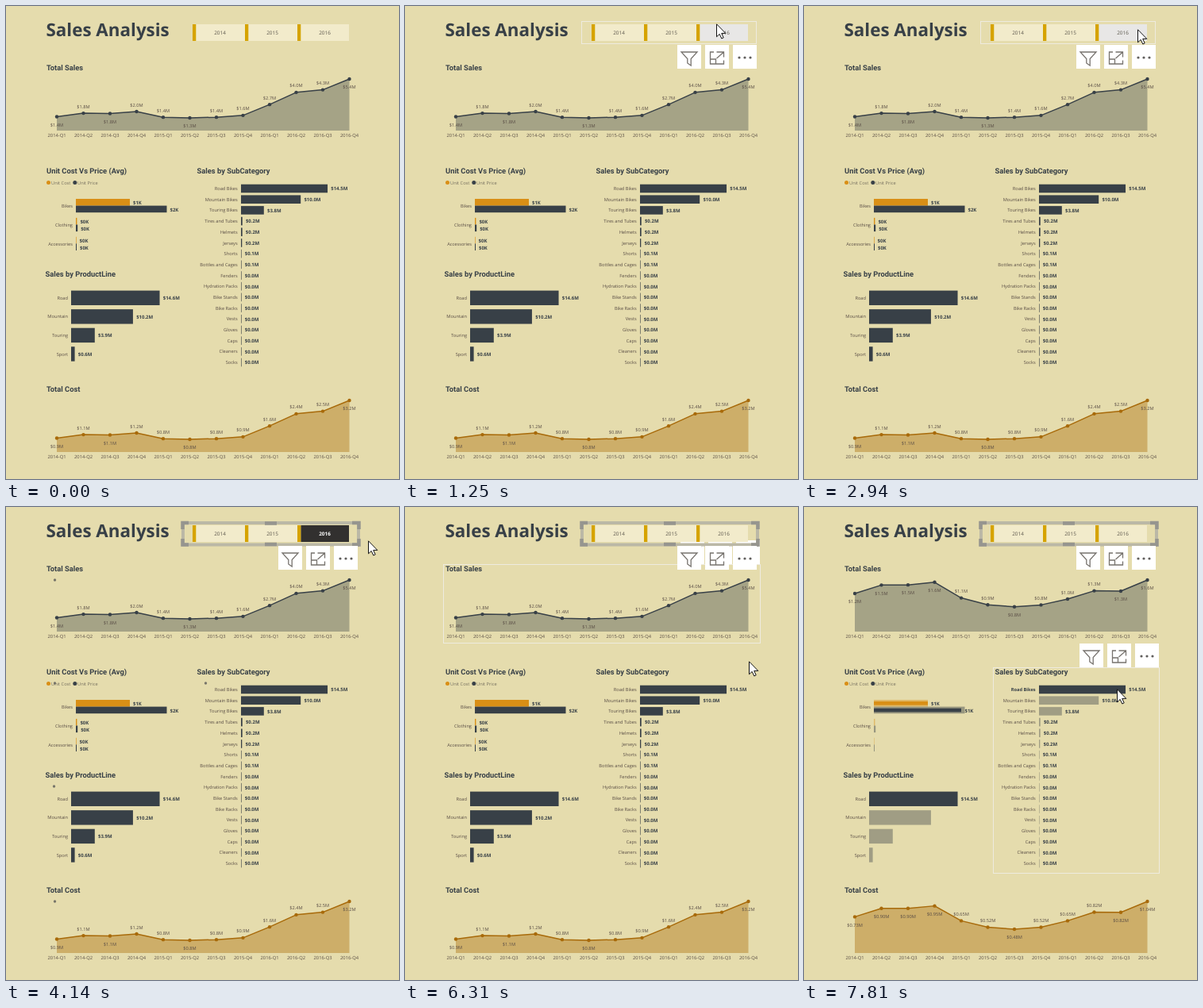
Recreate the animation shown at these times as an HTML page. Size 495x596 px, loop 8000 ms.

```html
<!DOCTYPE html>
<html lang="en">
<head>
<meta charset="utf-8">
<title>Sales Analysis</title>
<style>
html, body { margin: 0; width: 495px; height: 596px; overflow: hidden; background: #e5dcad; }
svg { display: block; font-family: "Open Sans", "Noto Sans", sans-serif; text-rendering: geometricPrecision; }
.head { font-family: Roboto, "Open Sans", sans-serif; font-weight: 600; }
</style>
</head>
<body>
<svg id="stage" width="495" height="596" viewBox="0 0 495 596"></svg>
<script>
const LOOP = 8000;
const BG = '#e5dcad', DARK = '#384047', GREY = '#594d45', ORANGE = '#d98f16', GOLD = '#d6a300';
const stage = document.getElementById('stage');

const mix = (a, b, p) => a + (b - a) * p;
const clamp = v => Math.max(0, Math.min(1, v));
const ease = p => p * p * (3 - 2 * p);
const ramp = (t, a, b) => ease(clamp((t - a) / (b - a)));
const during = (t, a, b) => t >= a && t < b;

const rect = (x, y, w, h, fill, extra = '') =>
  `<rect x="${x}" y="${y}" width="${w}" height="${h}" fill="${fill}" ${extra}/>`;
const dot = (x, y, r, fill) => `<circle cx="${x}" cy="${y}" r="${r}" fill="${fill}"/>`;
const text = (x, y, s, { size = 5.7, fill = GREY, anchor = 'start', bold = false, cls = '', alpha = 1 } = {}) =>
  `<text x="${x}" y="${y}" font-size="${size}" fill="${fill}" text-anchor="${anchor}" opacity="${alpha}"` +
  `${bold ? ' font-weight="700"' : ''}${cls ? ` class="${cls}"` : ''}>${s}</text>`;
const head = (x, y, s) => text(x, y, s, { size: 9.35, fill: DARK, cls: 'head' });
const value = (x, y, s, alpha = 1) => text(x, y, s, { size: 6, fill: DARK, bold: true, alpha });

// Line charts, in millions per quarter: all bikes, and only the clicked category.
const quarters = Array.from({ length: 12 }, (_, i) => `${2014 + Math.floor(i / 4)}-Q${i % 4 + 1}`);
const FIRST = 8; // first quarter of 2016
const revenue = [1.45, 1.82, 1.79, 2, 1.4, 1.33, 1.4, 1.59, 2.73, 4, 4.27, 5.4];
const sales = {
  base: 157, line: DARK, fill: '#a5a386', digits: 1, all: revenue,
  pick: [1.21, 1.48, 1.485, 1.57, 1.07, .852, .79, .848, 1.034, 1.297, 1.287, 1.64]
};
const cost = {
  base: 562, line: '#a86a0a', fill: '#cdae69', digits: 2, all: revenue.map(v => v * .592),
  pick: [.73, .9, .9, .95, .65, .52, .48, .52, .65, .823, .819, 1.04]
};

const level = (c, v, i) => c.base - 65 * v[i] / v[11];
// Labels go under the dips and under points too close to the top.
function labelSide(v, i, from = 0) {
  const left = i > from ? v[i - 1] : Infinity, right = v[i + 1] ?? Infinity;
  return v[i] < Math.min(left, right) || v[i] > .85 * v[11] ? 12.3 : -6.4;
}

function lineChart(c, year, pick) {
  const pts = quarters.map((q, i) => {
    const old = i < FIRST, k = Math.max(i, FIRST);
    return {
      q,
      x: mix(64 + 33.5 * i, 92 + 104 * (k - FIRST), year),
      y: mix(mix(level(c, c.all, i), level(c, c.all, k), year), level(c, c.pick, i), pick),
      off: mix(mix(labelSide(c.all, i), labelSide(c.all, k, FIRST), year), labelSide(c.pick, i), pick),
      label: '$' + (pick > .5 ? c.pick[i].toFixed(c.digits) : c.all[i].toFixed(1)) + 'M',
      alpha: old ? clamp(1 - 3 * year) : 1
    };
  });
  const path = pts.map(p => `${p.x} ${p.y}`).join('L');
  let s = `<path d="M${pts[0].x} ${c.base}L${path}L${pts[11].x} ${c.base}Z" fill="${c.fill}"/>` +
    `<path d="M${path}" fill="none" stroke="${c.line}" stroke-width="1.5" stroke-linejoin="round"/>`;
  for (const p of pts) {
    s += dot(p.x, p.y, 2.2, c.line);
    s += text(p.x, p.y + p.off, p.label, { anchor: 'middle', alpha: p.alpha });
    s += text(p.x, c.base + 8.1, p.q, { anchor: 'middle', size: 5.8, alpha: p.alpha });
  }
  return s;
}

// Bar charts: name, millions over all years, millions in 2016. Rows sort themselves.
const minor = names => names.split(',').map(n => [n, .02, .02]);
const products = {
  x: 82, y: 367.8, step: 23.55, h: 18.4, limit: 234.3, scale: [7.64, 21.9], names: 78, fade: true,
  rows: [['Road', 14.6, 5.3], ['Mountain', 10.2, 6.65], ['Touring', 3.9, 3.86], ['Sport', .6, .6]]
};
const subs = {
  x: 296, y: 230, step: 13.69, h: 10.6, limit: 433.3, scale: [7.52, 21.55], names: 291.7,
  rows: [['Road Bikes', 14.5, 5.22], ['Mountain Bikes', 10, 6.37], ['Touring Bikes', 3.83, 3.83],
    ['Tires and Tubes', .23, .23], ['Helmets', .22, .22], ['Jerseys', .17, .17],
    ['Shorts', .07, .07], ['Bottles and Cages', .06, .06],
    ...minor('Fenders,Hydration Packs,Bike Stands,Bike Racks,Vests,Gloves,Caps,Cleaners,Socks')]
};

function barChart(c, year, pick) {
  const rank = (v, col) => c.rows.filter(r => r[col] > v).length;
  return c.rows.map(([name, all, recent], i) => {
    const big = all > 1;
    const y = c.y + c.step * (big ? mix(rank(all, 1), rank(recent, 2), year) : i);
    const w = Math.max(.6, mix(all * c.scale[0], recent * c.scale[1], year));
    const chosen = i === 0;
    const amount = year > .5 ? recent : chosen && pick > .5 ? 14.5 : all;
    const bold = chosen && pick > 0 && !c.fade;
    return text(c.names, y + 2.1, name, { anchor: 'end', bold, fill: bold ? DARK : GREY }) +
      value(Math.min(c.x + w + 4.2, c.limit - 21), y + 2.3, `$${amount.toFixed(1)}M`, c.fade && !chosen ? 1 - pick : 1) +
      rect(c.x, y - c.h / 2, w, c.h, BG) +
      rect(c.x, y - c.h / 2, w, c.h, DARK, `fill-opacity="${chosen ? 1 : mix(1, .4, pick)}"`);
  }).join('');
}

function unitChart(year, pick) {
  let s = dot(53.5, 222.5, 2.5, ORANGE) + text(57, 224.7, 'Unit Cost', { fill: '#76705f' }) +
    dot(86.8, 222.5, 2.5, DARK) + text(90, 224.7, 'Unit Price', { fill: '#76705f' });
  const shade = `fill-opacity="${mix(1, .45, pick)}"`;
  const rows = [['Bikes', 68, 114.5], ['Clothing', 1.4, 2.2], ['Accessories', .6, 1]];
  rows.forEach(([name, a, b], i) => {
    const y = 243 + 23.9 * i, first = i === 0;
    a *= 1 + .013 * year;
    b *= 1 + .013 * year;
    s += text(84, y + 11, name, { anchor: 'end' });
    s += rect(88, y, a, 8.6, ORANGE, shade) + rect(88, y + 8.6, b, 8.6, DARK, shade);
    if (first)
      s += `<g opacity="${pick}">` + rect(88, y + 2, a, 4.6, ORANGE) + rect(88, y + 10.7, 110, 4.6, DARK) + '</g>';
    const price = !first ? '$0K' : year + pick > .5 ? '$1K' : '$2K';
    const alpha = first ? 1 : 1 - pick;
    s += value(92 + a, y + 6.9, first ? '$1K' : '$0K', alpha);
    s += value(92 + b - (first ? 4 * pick : 0), y + 16.1, price, alpha);
  });
  return s;
}

const areas = {
  slicer: { x: 222, y: 19, w: 221, h: 29, icons: [343, 49] },
  sales: { x: 48, y: 72, w: 400, h: 100, icons: [347, 42] },
  subs: { x: 238, y: 202, w: 210, h: 260, icons: [347, 172] },
  cost: { x: 48, y: 477, w: 400, h: 100, icons: [347, 447] }
};
const lastButton = { x: 371, y: 23, w: 61, h: 21 };
const inside = (p, a) => p && p.x >= a.x && p.x <= a.x + a.w && p.y >= a.y && p.y <= a.y + a.h;

const outline = a => rect(a.x + .5, a.y + .5, a.w - 1, a.h - 1, 'none', 'stroke="#eeebdf"');

function icons([x, y]) {
  const boxes = [0, 35, 70].map(d => rect(d, 0, 30, 30, '#fff')).join('');
  const dots = [78, 85, 92].map(d => dot(d, 16, 1.6, '#605e5c')).join('');
  return `<g transform="translate(${x} ${y})">${boxes}${dots}<path fill="none" stroke="#77736e" stroke-width="1.3"
    d="M5 9H25L17.2 17.5V26L12.8 23V17.5Z
    M46 9H41.5V24H58.5V19.5M49.5 9H58.5V15.5M58.5 9L49.5 17M53 9H58.5V14.5M41.5 18H48.5V24"/></g>`;
}

function handles() {
  return rect(223, 20, 221, 27.5, 'none', 'stroke="#bbb8a6" stroke-width="4"') +
    `<path d="M222.5 28V20H230M436 20H444.5V28M444.5 40V47.5H436M230 47.5H222.5V40M326 20.5H341M326 47H341"
      fill="none" stroke="#96958f" stroke-width="4.5"/>`;
}

function slicer(selected, hot) {
  return [2014, 2015, 2016].map((label, i) => {
    const x = 235 + 66 * i, last = i === 2, on = last && selected;
    const fill = on ? '#32302f' : last && hot ? '#e8e7e6' : '#f2ebcb';
    return rect(x, 23, 4.5, 21, GOLD) + rect(x + 4.5, 23, last ? 60.5 : 61.5, 21, fill) +
      text(x + 34.5, 36, label, { size: 6.4, anchor: 'middle', bold: on, fill: on ? '#fff' : '#5c574d' });
  }).join('');
}

// Pointer moves: from, to, then where the tip ends
const ENTER = 210;
const moves = [
  [ENTER, 550, 394, 300], [740, 1250, 392, 22], [1540, 1860, 455, 24], [2080, 2480, 420, 29],
  [3680, 3940, 456, 42], [4700, 4890, 424, 42], [6130, 6310, 433, 194], [6310, 6980, 425, 243],
  [7060, 7320, 394, 229]
];

function tipAt(t) {
  if (t < ENTER) return null;
  let x = 384, y = 545;
  for (const [a, b, tx, ty] of moves) {
    const p = ramp(t, a, b);
    x = mix(x, tx, p);
    y = mix(y, ty, p);
  }
  return { x, y };
}

const pointer = p => p ? `<path transform="translate(${p.x} ${p.y})" fill="#fff" stroke="#111"
  d="M.5 .8V16.8L4.2 13.4L6.8 19L9.2 17.9L6.7 12.4H11.8Z"/>` : '';

const CLICK = 3680, SELECT = 4140, CLEAR = 5440, PICK = 7460;

function draw(t) {
  const year = ramp(t, SELECT + 25, 4490) - ramp(t, CLEAR + 25, 5720);
  const pick = ramp(t, PICK, 7800);
  const pinned = t >= SELECT;
  // Hover trails the pointer and freezes while the click is handled.
  const seen = tipAt(during(t, CLICK, SELECT) ? CLICK : t - 70);
  const over = Object.keys(areas).find(k => inside(seen, areas[k]));

  let s = rect(0, 0, 495, 596, BG);
  s += text(50.5, 38.2, 'Sales Analysis', { size: 22.4, fill: DARK, bold: true });
  s += head(51, 81, 'Total Sales') + head(51, 211, 'Unit Cost Vs Price (Avg)') +
    head(240.5, 211, 'Sales by SubCategory') + head(49.5, 341, 'Sales by ProductLine') +
    head(51, 486, 'Total Cost');
  s += lineChart(sales, year, pick) + unitChart(year, pick) + barChart(subs, year, pick) +
    barChart(products, year, pick) + lineChart(cost, year, pick);

  if (during(t, SELECT, SELECT + 70))
    s += [[61.5, 92], [61.5, 222], [251.5, 222], [60.5, 352], [61.5, 497]]
      .map(([x, y]) => dot(x, y, 1.7, '#77756a')).join('');

  if (over && !(pinned && over === 'slicer')) s += outline(areas[over]) + icons(areas[over].icons);
  if (pinned) s += handles() + icons(areas.slicer.icons);
  s += slicer(during(t, SELECT, CLEAR), inside(seen, lastButton));

  stage.innerHTML = s + pointer(tipAt(t));
}

const start = performance.now();
function tick(now) {
  draw(Math.max(0, now - start) % LOOP);
  requestAnimationFrame(tick);
}
draw(0);
requestAnimationFrame(tick);
</script>
</body>
</html>
```
